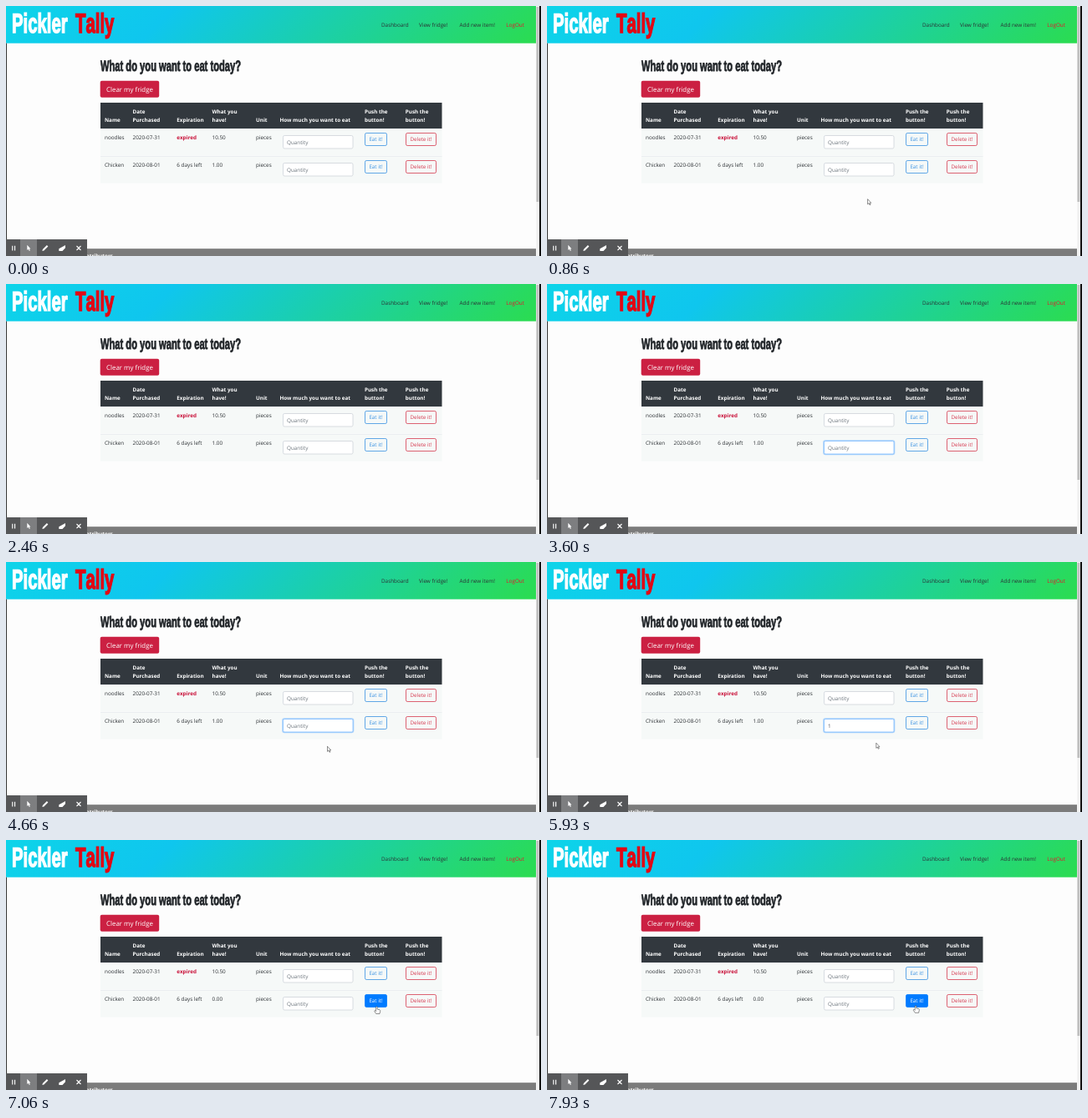
These frames come from a looping animation (640x300 px, 8000 ms). An HTML page:

```html
<!DOCTYPE html>
<html lang="en">
<head>
<meta charset="utf-8">
<title>Fridge</title>
<style>
  html, body { margin: 0; width: 100%; height: 100%; overflow: hidden; background: #fdfdfd; }
  svg { display: block; width: 640px; height: 300px; }
  text { font: 6.35px "Open Sans", "Noto Sans", sans-serif; fill: #2b2f33; text-rendering: geometricPrecision; }
  .bold { font-weight: 700; font-size: 6.3px; }
  .head { fill: #fff; }
  .mid { text-anchor: middle; }
  .hint { fill: #6c757d; font-size: 6.3px; }
  .condensed { font-family: "Liberation Sans", Arial, sans-serif; font-weight: 700; font-kerning: none;
    stroke-width: .045em; paint-order: stroke; }
</style>
</head>
<body>
<svg viewBox="0 0 640 300" xmlns="http://www.w3.org/2000/svg">
  <defs>
    <linearGradient id="sky" gradientUnits="userSpaceOnUse" x1="147.5" y1="-147.5" x2="486.5" y2="191.5">
      <stop offset="0" stop-color="#0dd4e9"/>
      <stop offset=".3" stop-color="#0fc6ee"/>
      <stop offset="1" stop-color="#2bdc50"/>
    </linearGradient>
    <path id="arrow" d="M0 0V6.2L1.5 4.9L2.5 7.1L3.5 6.6L2.5 4.6H4.2Z"/>
  </defs>

  <rect width="640" height="300" fill="#fdfdfd"/>
  <rect width="634" height="44.7" fill="url(#sky)"/>
  <g id="page"></g>

  <rect x="0" y="291.2" width="634" height="8.8" fill="#7b7b7b"/>
  <text class="bold head" x="128" y="302" text-anchor="end">Contributors</text>
  <rect x="634" width="4" height="300" fill="#f4f4f4"/>
  <rect x="634.4" y="1" width="3.2" height="234" rx=".5" fill="#c1c1c1"/>
  <rect x="638" width="2" height="300" fill="#111"/>
  <rect y="44.7" width=".9" height="256" fill="#222"/>

  <g id="toolbar">
    <rect y="280" width="97" height="20" fill="#555658"/>
    <rect x="17" y="280" width="20" height="20" fill="#7d7e80"/>
    <path d="M7.8 287.8v5.6M10.6 287.8v5.6M84.5 288l5 5M89.5 288l-5 5" stroke="#fff" stroke-width="1.1"/>
    <use href="#arrow" x="25.3" y="286.8" fill="#fff"/>
    <path d="M43.4 294l.5-2 5-5 1.5 1.5-5 5z" fill="#fff"/>
    <path d="M63.3 291.3L71 287v3.2L67.5 294h-4.2z" fill="#fff"/>
  </g>

  <g id="pointer" stroke="#222" stroke-width=".5" stroke-linejoin="round" fill="#fff">
    <use id="arrowShape" href="#arrow" x="-.5" y="-.8"/>
    <path id="handShape" d="M-.8 .7Q0-.4.8.7V3.4L3.7 4.1Q4.5 4.5 4.3 5.6L3.6 8.8H-.7L-2.7 5.8Q-2.6 4.6-1.5 5.1L-.8 5.8Z"/>
  </g>
</svg>

<script>
const LOOP = 8000, TICK = 200 / 3;
const NS = "http://www.w3.org/2000/svg";
const $ = id => document.getElementById(id);
const page = $("page");

function add(tag, attrs, content = "") {
  const el = document.createElementNS(NS, tag);
  for (const key in attrs) el.setAttribute(key, attrs[key]);
  el.textContent = content;
  return page.appendChild(el);
}
const label = (content, x, y, cls = "", style = "") => add("text", { x, y, class: cls, style }, content);
const box = (x, y, width, height, fill, extra = {}) => add("rect", { x, y, width, height, fill, ...extra });

// One shared condensed display style
function display(content, x, y, size, color) {
  add("text", { class: "condensed", transform: `translate(${x} ${y}) scale(.62 1)`,
    style: `font-size:${size}px;fill:${color};stroke:${color}` }, content);
}
function button(content, x, y, width, color) {
  const frame = box(x, y, width, 15, "transparent", { rx: 1.7, stroke: color, "stroke-width": .8 });
  const text = label(content, x + width / 2, y + 9.8, "mid", `fill:${color};font-size:6.25px`);
  return { frame, text };
}
function field(y) {
  const ring = box(331, y - .5, 84.5, 16.5, "none", { rx: 2, stroke: "#007bff", "stroke-opacity": .3, "stroke-width": 1.6, opacity: 0 });
  const frame = box(331.5, y, 83.5, 15.5, "#fff", { rx: 1.7, stroke: "#ced4da", "stroke-width": .8 });
  const hint = label("Quantity", 336, y + 10.3, "hint");
  return { ring, frame, hint };
}

display("Pickler", 7, 31.6, 32.8, "#fff");
display("Tally", 83, 31.6, 32.8, "#e30613");
display("What do you want to eat today?", 113, 78, 18, "#212529");

[["Dashboard", 449], ["View fridge!", 494], ["Add new item!", 542.5], ["LogOut", 598.3, "fill:#e8132b"]]
  .forEach(([content, x, style]) => label(content, x, 24.7, "", style));

box(112.7, 89.7, 70.5, 20.1, "#cb2042", { rx: 2 });
label("Clear my fridge", 148, 103, "head mid", "font-size:7.9px");

const columns = [118, 151.5, 204.3, 246.5, 299, 327.5, 429, 477.8];
const titles = ["Name", "Date|Purchased", "Expiration", "What you|have!", "Unit", "How much you want to eat", "Push the|button!", "Push the|button!"];
box(113, 116, 408.5, 31, "#32383e");
titles.forEach((title, i) => title.split("|").reverse()
  .forEach((line, up) => label(line, columns[i], 139 - up * 9.7, "bold head")));

const rows = [
  ["noodles", "2020-07-31", "expired", "10.50", "pieces"],
  ["Chicken", "2020-08-01", "6 days left", "1.00", "pieces"],
].map((cells, r) => {
  const top = 147 + r * 33;
  box(113, top, 408.5, 32.6, "#f6f9f8");
  box(113, top, 408.5, .5, "#dee2e6");
  const texts = cells.map((cell, i) => cell === "expired"
    ? label(cell, columns[i], top + 12.6, "bold", "fill:#c9123a")
    : label(cell, columns[i], top + 12.6));
  return {
    amount: texts[3],
    input: field(top + 8.5),
    eat: button("Eat it!", 429.5, top + 5.5, 26, "#3a92e2"),
    remove: button("Delete it!", 478.5, top + 5.5, 36, "#d63a50"),
  };
});
const { amount, input, eat } = rows[1];
const typed = label("1", 336, 198.8, "", "fill:#495057");
const caret = box(339.8, 192.6, .6, 7.6, "#222");

// Pointer path: time, x, y
const path = [
  [660, 381, 206], [860, 384, 232], [1060, 386, 247], [1460, 386, 240], [2060, 386, 240],
  [2330, 380, 206], [3800, 380, 206], [3860, 384, 229], [4130, 384, 229], [4330, 385, 222],
  [5800, 385, 222], [6130, 408, 212], [6460, 446, 194.5], [6660, 446, 194.5],
  [7130, 443, 200.5], [7800, 443, 200.5], [7930, 441, 198.5],
];
const clamp = v => Math.max(0, Math.min(1, v));
const between = (t, a, b) => t >= a && t < b;
const show = (el, on) => el.setAttribute("visibility", on ? "visible" : "hidden");

function pointerAt(t) {
  const next = path.findIndex(p => p[0] > t);
  if (next < 1) return path[next ? path.length - 1 : 0].slice(1);
  const [t0, x0, y0] = path[next - 1], [t1, x1, y1] = path[next];
  const k = (t - t0) / (t1 - t0);
  return [x0 + (x1 - x0) * k, y0 + (y1 - y0) * k];
}

const FOCUS = 3080, TYPE = 5390, CLICK = 6690, SAVED = 6990, HOVER = 6320;

function render(time) {
  const t = Math.floor((time + 7) / TICK) * TICK;

  const [x, y] = pointerAt(t);
  const hand = t >= HOVER;
  $("pointer").setAttribute("transform", `translate(${x} ${y})`);
  show($("arrowShape"), between(t, 660, 2300) || between(t, 3820, HOVER));
  show($("handShape"), hand);

  const focus = clamp((t - FOCUS) / 150) * (1 - clamp((t - CLICK) / 150));
  input.ring.setAttribute("opacity", focus);
  input.frame.setAttribute("stroke", focus > .4 ? "#80bdff" : "#ced4da");

  const filled = between(t, TYPE, SAVED);
  show(typed, filled);
  show(input.hint, !filled);
  const blinkStart = t < TYPE ? FOCUS : TYPE;
  caret.setAttribute("x", filled ? 339.8 : 336);
  show(caret, between(t, FOCUS, CLICK) && (t - blinkStart) % 1000 < 500);

  eat.frame.setAttribute("fill", hand ? "#007bff" : "transparent");
  eat.frame.setAttribute("stroke", hand ? "#007bff" : "#3a92e2");
  eat.text.style.fill = hand ? "#fff" : "#3a92e2";
  amount.textContent = t >= SAVED ? "0.00" : "1.00";
}

const start = performance.now();
function frame() {
  render((performance.now() - start) % LOOP);
  requestAnimationFrame(frame);
}
frame();
</script>
</body>
</html>
```
